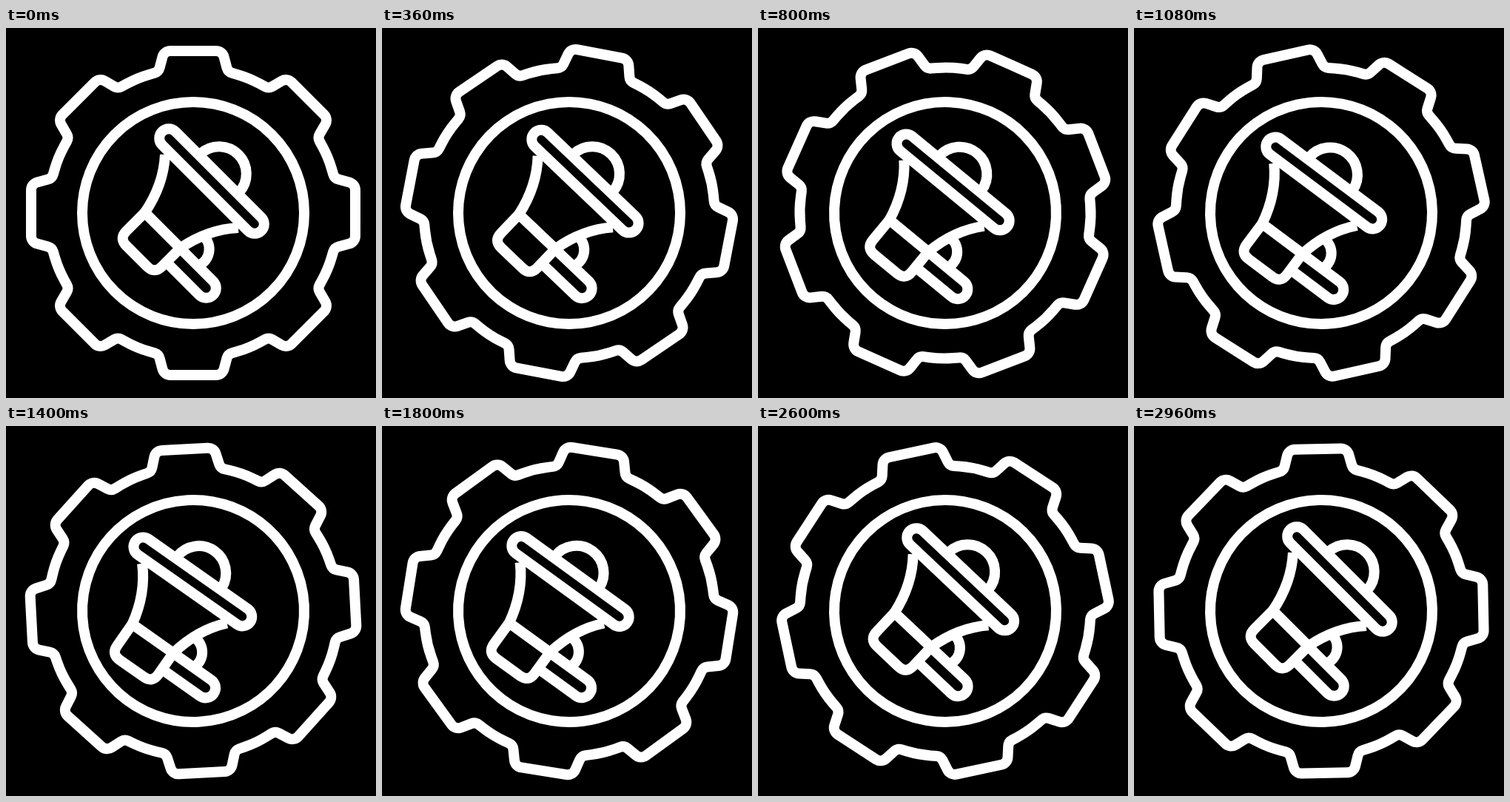
Animation of 500x500 px, one loop 3 s. Source, as an HTML page with a canvas:

```html
<!DOCTYPE html>
<html lang="en">
<head>
<meta charset="utf-8">
<title>Megaphone in a turning gear</title>
<style>
  html, body { margin: 0; width: 100%; height: 100%; overflow: hidden; background: #000; }
  canvas { display: block; width: 500px; height: 500px; }
</style>
</head>
<body>
<canvas width="500" height="500"></canvas>
<script>
const ctx = document.querySelector('canvas').getContext('2d');
const LOOP = 3000, STEP = 40, RAD = Math.PI / 180;
const CENTER = [253, 250], PIVOT = [285, 357];

// Tooth outline as [angle, radius, corner rounding], repeated every 45 degrees.
const TOOTH = [[10.2, 222.5, 11], [13.8, 196.5, 10], [22.5, 197.5, 150], [31.2, 196.5, 10], [34.8, 222.5, 11]];

function gearPath() {
  const path = new Path2D();
  path.moveTo(0, -219);
  for (let i = 0; i < 8; i++) {
    // The next point after each corner sets the direction of its rounding.
    TOOTH.forEach(([angle, radius, round], k) => {
      const [nextAngle, nextRadius] = TOOTH[k + 1] || [45, 219];
      const at = (a, r) => [r * Math.sin((a + i * 45) * RAD), -r * Math.cos((a + i * 45) * RAD)];
      path.arcTo(...at(angle, radius), ...at(nextAngle, nextRadius), round);
    });
  }
  path.closePath();
  return path;
}

const gear = gearPath();
const ring = new Path2D();
ring.arc(0, 0, 150, 0, 2 * Math.PI);

const capsule = (x1, y1, x2, y2, r) => {
  const d = r * Math.SQRT1_2;
  return new Path2D(`M${x1 - d} ${y1 + d}A${r} ${r} 0 0 1 ${x1 + d} ${y1 - d}` +
    `L${x2 + d} ${y2 - d}A${r} ${r} 0 0 1 ${x2 - d} ${y2 + d}Z`);
};

// Back to front; each part hides what lies behind it.
const megaphone = [
  new Path2D('M264 279A24 24 0 0 1 260 321'),
  capsule(225.5, 306.5, 270.5, 351.5, 13.3),
  new Path2D('M263 170A36.8 36.8 0 0 1 315 222'),
  new Path2D('M314 270Q273 272 235.5 297.5L187.5 249.5Q213 212 215 171'),
  new Path2D('M187.5 249.5L162.6 274.4Q152.7 284.3 162.6 294.2L190.8 322.4Q200.7 332.3 210.6 322.4L235.5 297.5Z'),
  capsule(220, 149, 336, 265, 12.8)
];

function rotated([x, y], degrees, draw) {
  ctx.save();
  ctx.translate(x, y);
  ctx.rotate(degrees * RAD);
  draw();
  ctx.restore();
}

function frame(now) {
  const t = Math.floor(now % LOOP / STEP) * STEP / LOOP;
  ctx.fillStyle = '#000';
  ctx.strokeStyle = '#fff';
  ctx.lineWidth = 14;
  ctx.lineJoin = 'round';
  ctx.fillRect(0, 0, 500, 500);

  rotated(CENTER, 90 * t, () => {
    ctx.stroke(gear);
    ctx.stroke(ring);
  });
  rotated(PIVOT, -5 * (1 - Math.cos(2 * Math.PI * t)), () => {
    ctx.translate(-PIVOT[0], -PIVOT[1]);
    for (const part of megaphone) {
      ctx.fill(part);
      ctx.stroke(part);
    }
  });
}

const start = performance.now();
function tick() {
  frame(performance.now() - start);
  requestAnimationFrame(tick);
}
tick();
</script>
</body>
</html>
```
